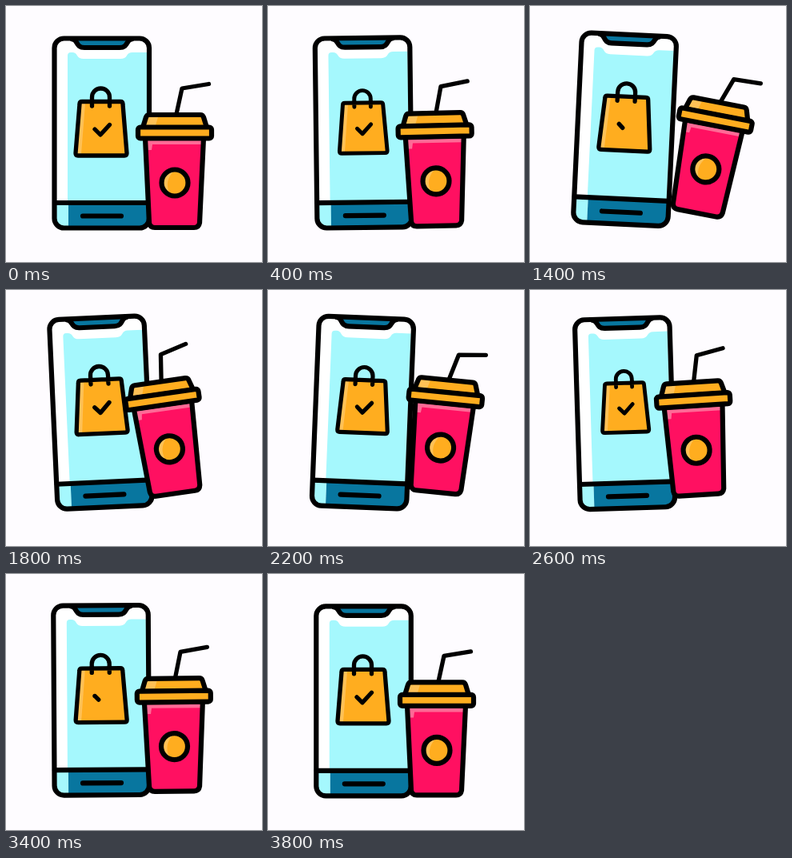
Animation, 320 px wide and 320 px high, one loop 4000 ms. Source, as an HTML page:

```html
<!DOCTYPE html>
<html lang="en">
<head>
<meta charset="utf-8">
<title>Mobile order</title>
<style>
html, body { margin: 0; width: 100%; height: 100%; overflow: hidden; background: #fefcff; }
svg { display: block; width: 100vw; height: 100vh; }
.line { fill: none; stroke: #000; stroke-width: 6.2; stroke-linecap: round; stroke-linejoin: round; }
.thin { stroke-width: 5.3; }
.orange { fill: #ffad1f; }
.shine { fill: #ffc156; }
</style>
</head>
<body>
<svg viewBox="0 0 320 320">
  <g id="phone">
    <rect x="60.5" y="40.5" width="118.5" height="237" rx="12" fill="#fff"/>
    <path d="M77 246V62q0-4 4-4h2q4 0 6 4t8 4H143q6 0 8-4t7-4H176V246Z" fill="#a5f8fd"/>
    <path d="M61 246H78V277H72q-11 0-11-11Z" fill="#a5f8fd"/>
    <path d="M78 246H179V266q0 11-11 11H78Z" fill="#08769f"/>
    <path class="line" fill="#08769f" style="fill:#08769f" d="M83 41.500C90 42 87 52 98 52H142C153 52 150 42 157 41.500"/>
    <path class="line" d="M61 246H178M96 262.500H144"/>
    <rect class="line" x="60.5" y="40.5" width="118.5" height="237" rx="12"/>
  </g>
  <g id="bag">
    <path class="orange" d="M95 119.500H143q3 0 3 3L151 184q0 3-3 3H90q-3 0-3-3L92 122.500q0-3 3-3Z"/>
    <path class="shine" d="M92 122H99L94 185H87Z"/>
    <path class="line thin" d="M95 119.500H143q3 0 3 3L151 184q0 3-3 3H90q-3 0-3-3L92 122.500q0-3 3-3ZM107.500 125V114a11 11 0 0 1 22 0V125"/>
    <path id="check" class="line thin" pathLength="100" d="M111 154L118 161L129.500 148.500"/>
  </g>
  <g id="cup">
    <path id="straw" class="line thin" d="M213 135L220 103L253.500 97.500"/>
    <path d="M174 165H247L242 271q-1 6-7 6H186q-6 0-7-6Z" fill="#ff1061"/>
    <path d="M176 168H245V173H183L182 180H177Z" fill="#ff6a96"/>
    <path class="line" d="M174 165H247L242 271q-1 6-7 6H186q-6 0-7-6Z"/>
    <path class="orange" d="M171 152L175 139q1-3 4-3H243q3 0 4 3L251 152Z"/>
    <path class="shine" d="M178 139H190L187 149H175Z"/>
    <path class="line" d="M171 152L175 139q1-3 4-3H243q3 0 4 3L251 152Z"/>
    <rect class="line" style="fill:#ffad1f" x="165" y="151.5" width="92" height="14" rx="3"/>
    <circle class="orange" cx="211" cy="221" r="16.5"/>
    <path class="shine" d="M209 207a14 14 0 0 0-5 26Q198 219 209 207Z"/>
    <circle class="line" cx="211" cy="221" r="16.5"/>
  </g>
</svg>
<script>
const LOOP = 4000, STEP = 200, PEAK = 1400, REST = 3800;
const el = id => document.getElementById(id);
const set = (id, transform) => el(id).setAttribute('transform', transform);

// Eased progress from 0 to 1 between two times.
function ramp(from, to, t) {
  const p = Math.min(1, Math.max(0, (t - from) / (to - from)));
  return (1 - Math.cos(Math.PI * p)) / 2;
}

// The cup winds up, swings out and then rings until it is at rest.
function swing(t) {
  if (t < PEAK) return 13.5 * ramp(800, PEAK, t) - 2.5 * ramp(0, 800, t);
  const fade = Math.max(0, (REST - t) / (REST - PEAK)) ** 1.6;
  return 11 * fade * Math.cos(2 * Math.PI * (t - PEAK) / 800);
}

function draw(t) {
  const turn = Math.PI * t / LOOP;
  const rise = Math.sin(turn) ** 2;
  const cupRise = Math.sin(turn - 0.12 * rise) ** 2;
  const tilt = swing(t);
  const lean = 2.8 * Math.tanh(tilt / 5);

  set('phone', `translate(${-1.3 * Math.sin(turn)} ${-6 * rise}) rotate(${lean} 120 159)`);
  set('cup', `translate(${0.8 * tilt} ${-24 * cupRise}) rotate(${tilt} 211 221)`);
  set('straw', `rotate(${0.65 * tilt} 213 135)`);

  // The bag pops and its check mark redraws every half loop.
  const half = t % (LOOP / 2);
  const scale = 1 - 0.09 * ramp(0, 600, half) + 0.25 * ramp(600, 800, half) - 0.16 * ramp(800, 1100, half);
  set('bag', `translate(0 ${-7.8 * rise}) rotate(${lean} 120 159)
    translate(119 153) scale(${scale}) translate(-119 -153)`);

  const redraw = half >= 1200;
  const from = redraw ? 0 : 100 * ramp(900, 1200, half);
  const length = redraw ? 100 * ramp(1200, 1800, half) : 100 - from;
  const check = el('check');
  check.style.visibility = length > 0 ? 'visible' : 'hidden';
  check.style.strokeDasharray = length < 100 ? `0 ${from} ${length} 200` : 'none';
}

function tick() {
  draw(Math.floor(performance.now() % LOOP / STEP) * STEP);
  requestAnimationFrame(tick);
}
tick();
</script>
</body>
</html>
```
